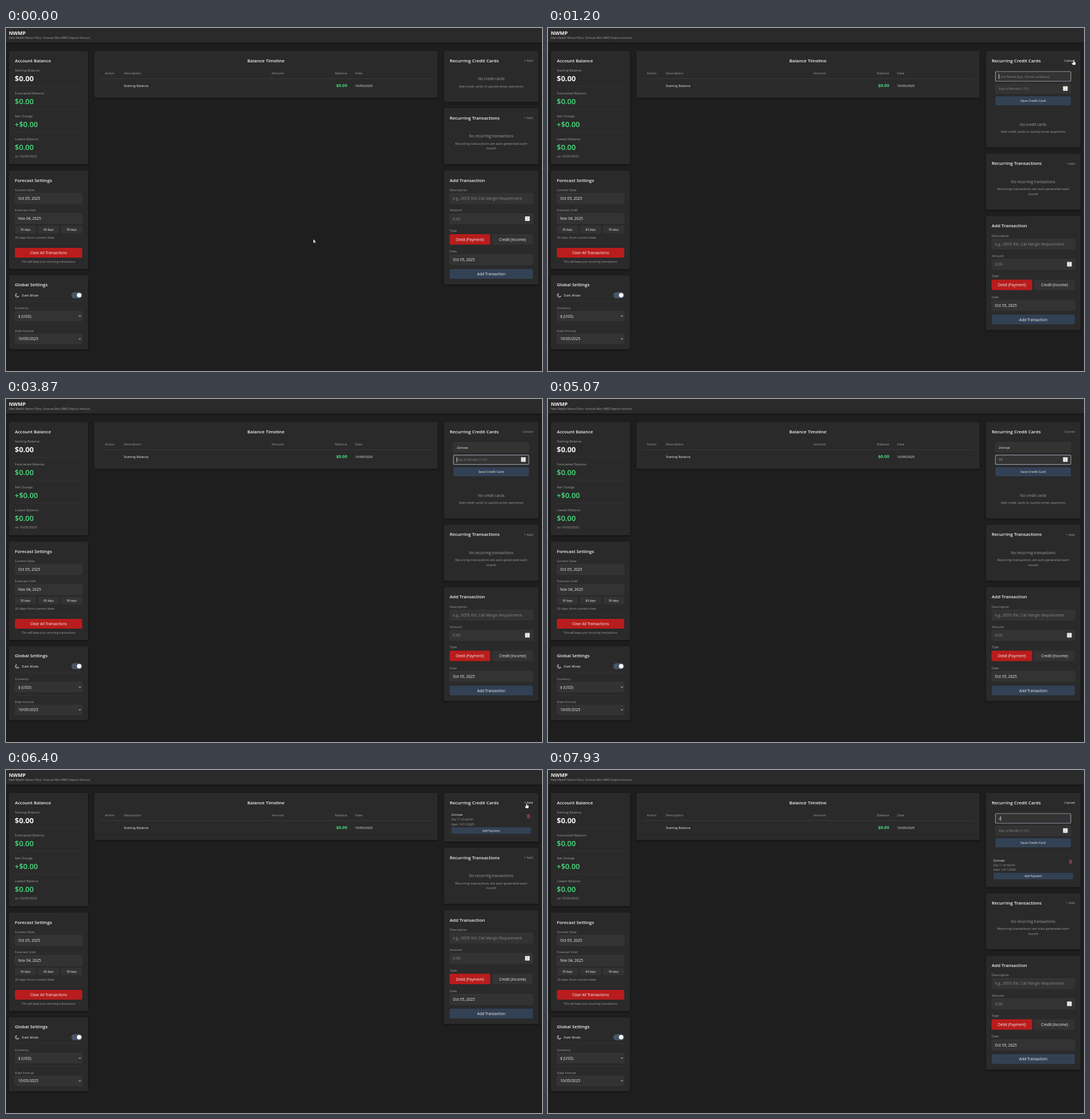
An HTML page that plays this animation: 935x599 px, repeating every 8000 ms.

```html
<!DOCTYPE html>
<html lang="en">
<head>
<meta charset="utf-8">
<title>Balance forecast</title>
<style>
  html, body { margin: 0; width: 100%; height: 100%; overflow: hidden; background: #1e1e1e; }
  svg { display: block; width: 100vw; height: 100vh; font-family: "Open Sans", "Noto Sans", sans-serif; }
  text { white-space: pre; }
  .panel { fill: #2a2a2a; filter: drop-shadow(0 1px 1.5px rgba(0, 0, 0, .5)); }
</style>
</head>
<body>
<svg id="stage" viewBox="0 0 935 599"></svg>
<script>
const WHITE = '#f3f3f3', GRAY = '#a0a0a0', DIM = '#8a8a8a', GREEN = '#4ade80';
const RED = '#b91c1c', SLATE = '#334155', SLATE_HOVER = '#475569';
const FIELD = '#333333', EDGE = '#3d3d3d', FOCUS = '#8b93a0';
const TINY = 4.9, SMALL = 5.68, BASE = 6.55, HEAD = 7.9, BIG = 12.9;

// y is the middle of the capitals
const text = (x, y, str, size = SMALL, fill = GRAY, { anchor = 'start', weight = 400, id = '' } = {}) =>
  `<text id="${id}" x="${x}" y="${(y + size * .36).toFixed(2)}" font-size="${size}" fill="${fill}" ` +
  `text-anchor="${anchor}" font-weight="${weight}">${str}</text>`;
const middle = (x, y, str, size, fill, weight = 400) => text(x, y, str, size, fill, { anchor: 'middle', weight });
const heading = (x, y, str) => text(x, y, str, HEAD, WHITE, { weight: 600 });
const box = (x, y, w, h, fill, attrs = '', r = 2.2) =>
  `<rect x="${x}" y="${y}" width="${w}" height="${h}" rx="${r}" fill="${fill}" ${attrs}/>`;
const panel = (x, y, w, h, id = '') => box(x, y, w, h, '#2a2a2a', `class="panel" id="${id}"`, 2.8);
const rule = (x, y, w, color = '#3a3a3a') => `<path d="M${x} ${y}h${w}" stroke="${color}" stroke-width=".6"/>`;
const outline = (id = '') => `stroke="${EDGE}" stroke-width=".6" id="${id}"`;
const field = (x, y, w, h, str, fill = WHITE) =>
  box(x, y, w, h, FIELD, outline()) + text(x + 5.6, y + h / 2 + .2, str, 6.6, fill);
const button = (x, y, w, h, str, fill, size = BASE, id = '') =>
  box(x, y, w, h, fill, `id="${id}"`) + middle(x + w / 2, y + h / 2 + .3, str, size, WHITE);
const spinner = (x, y) => box(x, y, 8, 8, '#f2f2f2', '', .6) +
  `<path d="M${x + 2.4} ${y + 3.1}l1.6-1.5 1.6 1.5M${x + 2.4} ${y + 4.9}l1.6 1.5 1.6-1.5" fill="none" stroke="#777" stroke-width=".7"/>`;
const select = (y, str) => field(15.7, y, 117.3, 17, str) +
  `<path d="M127 ${y + 7.6}l1.8 1.9 1.8-1.9" fill="none" stroke="#eee" stroke-width=".9"/>`;
const group = (id, body) => `<g id="${id}">${body}</g>`;

const header = box(0, 0, 935, 25.5, '#2a2a2a', 'class="panel"', 0) +
  text(5, 8.6, 'NWMP', 8.75, WHITE, { weight: 700 }) +
  text(5, 17.4, 'New Wealth Manor Plans. Forecast Best MMF Deposit Amount.', TINY);

const stat = (y, label, value, fill, weight = 600) =>
  text(15.5, y, label) + text(15.3, y + 14.2, value, BIG, fill, { weight });
const account = panel(5, 40, 138, 198) + heading(15.5, 57, 'Account Balance') +
  stat(74, 'Starting Balance', '$0.00', WHITE, 700) +
  stat(114, 'Forecasted Balance', '$0.00', GREEN) +
  stat(154.2, 'Net Change', '+$0.00', GREEN) +
  stat(194.4, 'Lowest Balance', '$0.00', GREEN) +
  text(15.5, 223.8, 'on 10/05/2025') +
  [101.6, 141.8, 182].map(y => rule(15.5, y, 117.5)).join('');

const forecast = panel(5, 249, 138, 172) + heading(15.5, 265.7, 'Forecast Settings') +
  text(15.5, 282.5, 'Current Date') + field(15.7, 288.6, 117.3, 17.8, 'Oct 05, 2025') +
  text(15.5, 318, 'Forecast Until') + field(15.7, 323.8, 117.3, 17.8, 'Nov 04, 2025') +
  [30, 60, 90].map((days, i) => button(15.6 + i * 40.3, 345.6, 36.8, 13, days + ' days', FIELD, TINY)).join('') +
  text(15.5, 365.6, '30 days from current date') + rule(15.5, 376.6, 117.5) +
  button(15.5, 384, 117.5, 17, 'Clear All Transactions', RED, 6.45) +
  middle(74.2, 408, 'This will keep your recurring transactions', TINY, GRAY);

const settings = panel(5, 432, 138, 129) + heading(15.5, 448.5, 'Global Settings') +
  '<path d="M18.6 463.6a3.4 3.4 0 1 0 4.1 4.5a3 3 0 0 1-4.1-4.5z" fill="none" stroke="#ddd" stroke-width=".8"/>' +
  text(27.5, 467, 'Dark Mode', SMALL, WHITE) +
  box(114, 461.2, 19, 10.8, SLATE_HOVER, '', 5.4) + '<circle cx="127.6" cy="466.6" r="3.9" fill="#fff"/>' +
  rule(15.5, 477, 117.5) + text(15.5, 489.2, 'Currency') + select(494.6, '$ (USD)') +
  rule(15.5, 517.2, 117.5) + text(15.5, 528.8, 'Date Format') + select(534.3, '10/05/2025');

const column = (x, str, anchor) => text(x, 79, str, 5.72, GRAY, { anchor, weight: 500 });
const timeline = panel(154, 40, 599, 82) + middle(453.5, 57, 'Balance Timeline', HEAD, WHITE, 600) +
  column(172.5, 'Action') + column(205.5, 'Description') + column(484.8, 'Amount', 'end') +
  column(595, 'Balance', 'end') + column(609, 'Date') + rule(164.5, 88.6, 578, '#454545') +
  text(205.5, 100.6, 'Starting Balance', 5.7, WHITE) +
  text(595.2, 100.6, '$0.00', 7.5, GREEN, { anchor: 'end', weight: 700 }) +
  text(609, 100.6, '10/05/2025', 5.75, WHITE);

const cardForm =
  box(780.5, 76, 131.5, 17, FIELD, outline('nameBox')) + text(786.4, 84.8, '', SMALL, WHITE, { id: 'nameText' }) +
  box(780.5, 97.8, 131.5, 16.6, FIELD, outline('dayBox')) + text(786.4, 106.2, '', SMALL, WHITE, { id: 'dayText' }) +
  spinner(898.5, 101.7) + button(780.5, 119.2, 131.5, 15.8, 'Save Credit Card', SLATE, 5.75, 'save') +
  '<rect id="caret" width=".7" height="8.6" fill="#fff"/>';
const cardItem = box(773.7, 70, 145, 44.6, 'none', 'stroke="#353535" stroke-width=".6"') +
  text(777, 78.1, 'Zonvae', SMALL, WHITE) + text(777, 86.4, 'Day 11 of month', TINY) +
  text(777, 94.9, 'Next: 10/11/2025', TINY) + button(777, 100, 139, 11.6, 'Add Payment', SLATE, TINY) +
  '<path d="M909 79h5M910.6 78.8v-1h1.8v1M909.6 79.3l.3 4.2h3.2l.3-4.2M911 80.5v2M912.1 80.5v2" fill="none" stroke="#e8505f" stroke-width=".7"/>';
const cards = panel(764, 40, 165, 89, 'cardPanel') + heading(774, 57, 'Recurring Credit Cards') +
  text(919, 56.9, '+ Add', 5.8, GRAY, { anchor: 'end', id: 'toggle' }) + group('form', cardForm) +
  group('cardList', group('empty', middle(846.4, 88.8, 'No credit cards', 6.6, GRAY) +
    middle(846.4, 101.5, 'Add credit cards to quickly enter payments', SMALL, GRAY)) + group('item', cardItem));

const recurring = panel(764, 140, 165, 98) + heading(774, 157, 'Recurring Transactions') +
  text(919, 157, '+ Add', 5.8, GRAY, { anchor: 'end' }) +
  middle(846.4, 189, 'No recurring transactions', 6.5, GRAY) +
  middle(846.4, 201.8, 'Recurring transactions are auto-generated each', SMALL, GRAY) +
  middle(846.4, 210.4, 'month', SMALL, GRAY);
const addForm = panel(764, 249, 165, 199) + heading(774, 266, 'Add Transaction') +
  text(774, 283, 'Description') + field(774, 288.7, 145, 17.8, 'e.g., 0DTE KVL Call Margin Requirement', DIM) +
  text(774, 318.4, 'Amount') + field(774, 324.2, 145, 17.8, '0.00', DIM) + spinner(905.5, 329) +
  text(774, 353.8, 'Type') + button(773.8, 360, 70.9, 18.2, 'Debit (Payment)', RED) +
  button(848.2, 360, 70.8, 18.2, 'Credit (Income)', FIELD) +
  text(774, 390, 'Date') + field(774, 395.8, 145, 17.8, 'Oct 05, 2025') +
  button(774, 421, 145, 17, 'Add Transaction', SLATE, 6.5);

const cursors = group('arrow', '<path d="M0 0v7.2l1.7-1.5 1.1 2.4 1.2-.5-1.1-2.4h2.2z" fill="#fff" stroke="#000" stroke-width=".5"/>') +
  group('hand', '<path d="M-.9.8q.9-1.5 1.8 0v2.6l2.3.6q1 .3.9 1.4l-.6 3.8h-4.7l-2-3.4q-.3-1 .8-.8l1.5 1z" fill="#fff" stroke="#000" stroke-width=".5"/>');

const stage = document.getElementById('stage');
stage.innerHTML = header + account + forecast + settings + timeline + cards +
  group('lower', recurring + addForm) + cursors;
const el = id => document.getElementById(id);
const show = (id, on) => el(id).setAttribute('display', on ? 'inline' : 'none');
const set = (id, attr, value) => el(id).setAttribute(attr, value);

// All times below are ticks of 1/15 s
const TICK = 1000 / 15, TICKS = 120, FORM_HEIGHT = 79.5;
const OPENED = 18, SAVED = 91, REOPENED = 101;
const PATHS = [
  [[0, 536, 368.5], [1, 817, 208]],
  [[5, 930, 81], [8, 921, 62], [11, 916.6, 55.5], [20, 916.6, 55.5], [23, 922, 68]],
  [[82, 922, 168], [86, 860, 134], [89, 843.2, 130.5], [92, 843.2, 130.5], [94, 876, 92], [96, 908, 57.8],
    [104, 908, 57.8], [105, 908, 59.3], [117, 908, 59.3]],
];
const NAME_KEYS = [[34, 'Z'], [37, 'Zon'], [39, 'Zonv'], [46, 'Zonva'], [50, 'Zonvae']];
const DAY_KEYS = [[65, '1'], [68, '11']];

const typed = (keys, n) => keys.reduce((last, [at, str]) => n >= at ? str : last, '');
const lastAtOrBefore = (times, n) => Math.max(...times.filter(t => t <= n));

function cursorAt(n) {
  const path = PATHS.find(p => n >= p[0][0] && n <= p[p.length - 1][0]);
  if (!path) return null;
  const i = Math.max(1, path.findIndex(p => p[0] >= n));
  const [t0, x0, y0] = path[i - 1], [t1, x1, y1] = path[i];
  const k = (n - t0) / (t1 - t0);
  return { x: x0 + (x1 - x0) * k, y: y0 + (y1 - y0) * k };
}

function fillField(id, value, placeholder) {
  el(id).textContent = value || placeholder;
  set(id, 'fill', value ? WHITE : DIM);
}

function focusField(id, on) {
  set(id, 'stroke', on ? FOCUS : EDGE);
  set(id, 'stroke-width', on ? 1.2 : .6);
}

function draw(n) {
  const saved = n >= SAVED, open = (n >= OPENED && !saved) || n >= REOPENED;
  const shift = (open ? FORM_HEIGHT : 0) - (saved ? 4.2 : 0);
  set('cardPanel', 'height', 89.3 + shift);
  set('lower', 'transform', `translate(0 ${shift})`);
  set('cardList', 'transform', `translate(0 ${open ? FORM_HEIGHT : 0})`);
  show('form', open);
  show('empty', !saved);
  show('item', saved);

  const cursor = cursorAt(n);
  const onToggle = cursor ? cursor.x > 902 && cursor.x < 920 && cursor.y < 62 : n > 117;
  el('toggle').textContent = open ? 'Cancel' : '+ Add';
  set('toggle', 'fill', onToggle ? WHITE : GRAY);

  if (open) {
    const name = n >= REOPENED ? (n >= 118 ? 'Z' : '') : typed(NAME_KEYS, n);
    const day = n >= REOPENED ? '' : typed(DAY_KEYS, n);
    fillField('nameText', name, 'Card Name (e.g., Zonva Larkspur)');
    fillField('dayText', day, 'Day of Month (1-31)');
    const onName = n < 58 || n >= REOPENED, onDay = n >= 58 && n < 90;
    focusField('nameBox', onName);
    focusField('dayBox', onDay);

    const resets = [OPENED, ...NAME_KEYS.map(k => k[0]), 58, ...DAY_KEYS.map(k => k[0]), REOPENED, 118];
    const blinkOn = Math.floor((n - lastAtOrBefore(resets, n)) / 8) % 2 === 0;
    const value = onName ? name : day;
    const width = value ? el(onName ? 'nameText' : 'dayText').getComputedTextLength() : 0;
    show('caret', (onName || onDay) && blinkOn);
    set('caret', 'x', 786.2 + width);
    set('caret', 'y', onName ? 80.3 : 101.8);
  }
  const onSave = !!cursor && open && cursor.x < 912 && cursor.y > 119 && cursor.y < 135;
  set('save', 'fill', onSave ? SLATE_HOVER : SLATE);

  show('arrow', cursor && !onToggle);
  show('hand', cursor && onToggle);
  if (cursor) set(onToggle ? 'hand' : 'arrow', 'transform', `translate(${cursor.x} ${cursor.y})`);
}

const start = performance.now();
function loop() {
  const t = performance.now() - start;
  draw(Math.floor((t + 3.5) / TICK) % TICKS);
  requestAnimationFrame(loop);
}
draw(0);
requestAnimationFrame(loop);
</script>
</body>
</html>
```
